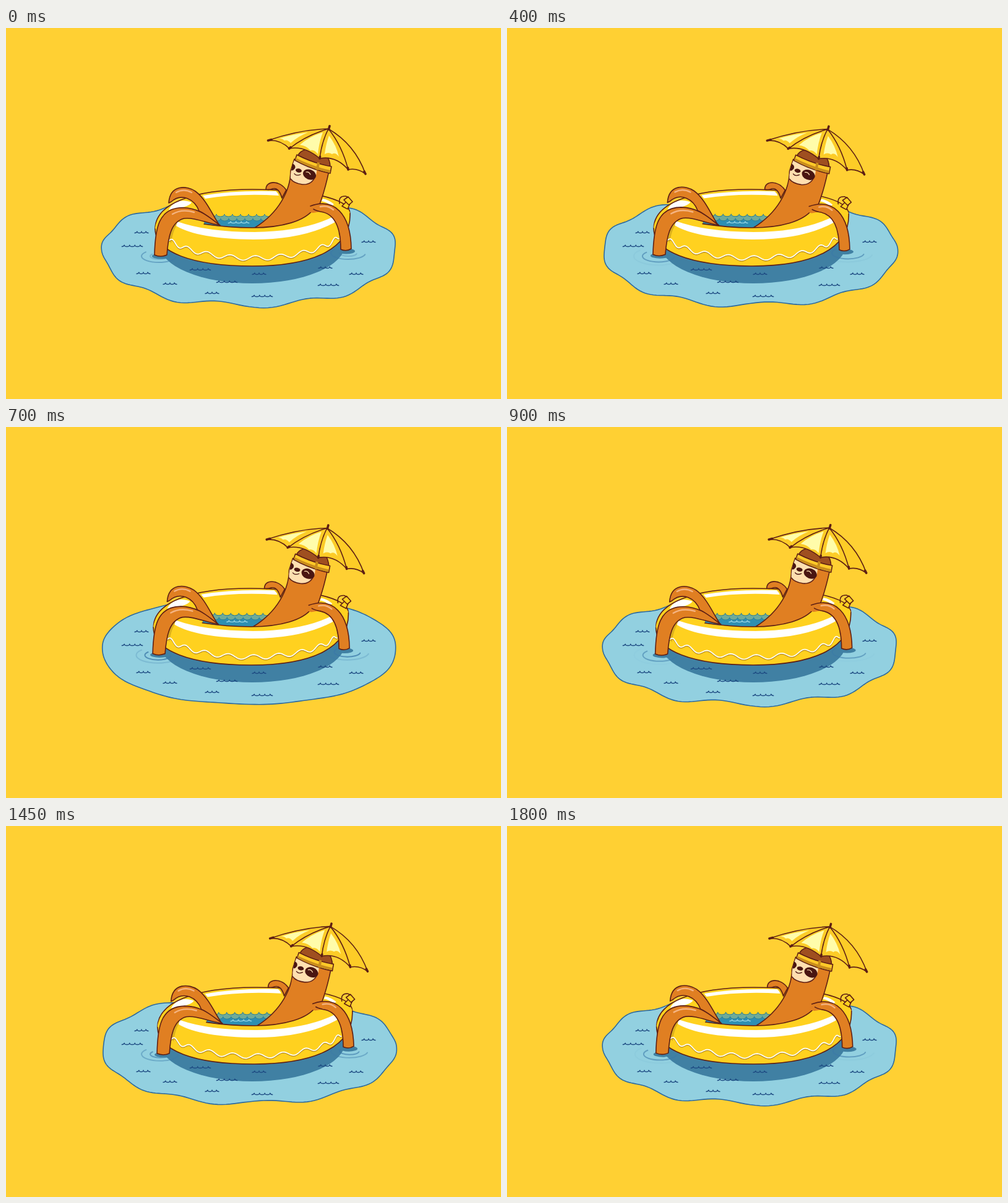
Animation, 800 px wide and 600 px high, one loop 1850 ms. Source, as an HTML page:

```html
<!DOCTYPE html>
<html lang="en">
<head>
<meta charset="utf-8">
<title>Floating sloth</title>
<style>
html, body { margin: 0; height: 100%; overflow: hidden; background: #ffd033 }
svg { display: block; width: 800px; height: 600px }
path, ellipse { stroke-linecap: round; stroke-linejoin: round }
.ink { stroke: #5e1f14; stroke-width: 1.6 }
.line { fill: none }
.tip { stroke-width: 3.6 }
.fur { fill: #e07f22 }
.gold { fill: #ffd11f }
.shade { fill: #dcb01c }
.dark { fill: #4a1612 }
.pale { fill: #fffcaa }
.white { fill: #fff }
.shadow { fill: #4080a3 }
.shine { fill: none; stroke: #f5b482; stroke-width: 2.4 }
.ring { fill: none; stroke: #3a78a8; stroke-width: 2 }
.mark { fill: none; stroke: #1d4a82; stroke-width: 1.3 }
</style>
</head>
<body>
<svg viewBox="0 0 800 600">
  <path id="pond" fill="#92d0e0" stroke="#2d6a9e" stroke-width="1.6"/>
  <ellipse class="shadow" cx="398" cy="350" rx="150" ry="63"/>
  <path id="marks" class="mark"/>
  <g id="rings"></g>

  <g id="float">
    <ellipse class="shadow" cx="251" cy="369" rx="15" ry="4.5"/>
    <ellipse class="shadow" cx="550" cy="361" rx="14" ry="4.5"/>

    <!-- tube, back half -->
    <path class="gold" d="M241 325C241 285 300 261 398 261C470 261 556 272 556 300C558 355 500 385 398 385C300 385 241 362 241 325Z"/>
    <path class="white" d="M318 271Q370 262 436 264Q440 267 441 271Q375 267 322 276Z"/>
    <path class="shade" d="M436 262L456 264L449 290Q446 272 436 262Z"/>
    <path class="white" d="M263 294C270 280 285 276 300 282Q296 290 263 294Z"/>
    <path class="white" d="M512 276Q522 278 530 285L526 288Q518 281 510 280Z"/>
    <g id="pool"></g>
    <path class="ink line" d="M241 325C241 285 300 261 398 261C470 261 556 272 556 300"/>

    <!-- valve -->
    <path class="ink gold" d="M543 288L550 281L556 284L552 293Z"/>
    <path class="ink gold" d="M546 278L553 273L560 281L554 286Z"/>
    <path class="ink line" d="M539 284Q537 271 549 272L553 274"/>

    <!-- far arm, body and face -->
    <path class="ink fur" d="M420 261C420 246 442 246 453 262L446 275C443 264 438 258 431 260Q426 262 420 261Z"/>
    <path class="ink fur" d="M460 231C460 262 441 299 402 323L480 330L505 290Q515 265 522 231L500 215L466 212Z"/>
    <path fill="#ffdfb0" d="M466 214L502 224C504 244 493 255 479 253Q465 251 460 245Q459 230 466 214Z"/>
    <path class="ink line" d="M460 244Q465 251 479 253Q494 254 500 240"/>
    <ellipse class="dark" cx="490.5" cy="237" rx="11" ry="8" transform="rotate(22 490.5 237)"/>
    <path class="dark" d="M463 219Q469 222 467 227Q463 232 461 230Z"/>
    <ellipse class="dark" cx="473" cy="230.5" rx="5" ry="3.2" transform="rotate(12 473 230.5)"/>
    <path class="line" stroke="#4a1612" stroke-width="1.3" d="M466 235.5Q469 240 476 237"/>
    <path class="line" stroke="#ffdfb0" stroke-width="1.2" d="M485 233Q490 232 492 237"/>

    <!-- hat -->
    <path class="ink" fill="#9f4f20" d="M472 206C480 188 524 192 524 225Q497 219 472 206Z"/>
    <path class="ink" fill="#ffc928" d="M470 205Q497 219 526 224L524 235Q494 229 467 214Z"/>
    <path fill="#c98d1c" d="M468 210Q496 224 524 230L523.5 234Q494 228 468 213.5ZM503 217L507 218L505 230L501 229Z"/>

    <!-- umbrella -->
    <path class="ink" fill="#fdcc27" d="M423 182C455 171 489 164 521 163C550 180 570 205 581 236Q568 226 553 229Q533 206 507 211Q482 190 458 195Q443 180 423 182Z"/>
    <path class="pale" d="M441 179Q463 172 488 169Q472 175 460 186Q455 180 450 182Q446 178 441 179ZM475 189Q491 175 512 169Q506 184 504 204Q498 196 492 198Q485 190 475 189ZM515 204Q517 188 522 174Q534 190 538 208Q532 200 527 204Q521 200 515 204Z"/>
    <path class="ink line" d="M521 163Q484 174 458 195M521 163Q510 185 507 211M521 163Q543 190 553 229"/>
    <path class="ink line tip" d="M521.5 164L523 158.500M423.500 182L429 180.500M457.500 195L460 193M507 211L507.500 208M553 229L552.500 226M581 236L579 232"/>

    <!-- tube, front half -->
    <path class="gold" d="M268 300C290 315 340 323 398 323C447 323 483 312 497 293C530 285 556 290 556 300C558 355 500 385 398 385C300 385 241 362 241 325C241 312 250 302 268 300Z"/>
    <path class="shade" d="M262 342Q264 320 278 308L283 310Q270 322 267 348ZM543 315L537 333L541 339Z"/>
    <path class="white" d="M277 313Q325 330 402 330Q485 329 533 303Q540 307 530 315Q480 342 400 342Q310 341 275 320Z"/>
    <path id="dripShade" class="line" stroke="#b98e22" stroke-width="1.5" transform="translate(0 1.5)"/>
    <path id="drip" class="line" stroke="#fff" stroke-width="1.7"/>
    <path class="ink line" d="M320 317Q360 323 398 323C447 323 483 312 497 293M556 300C558 355 500 385 398 385C300 385 241 362 241 325"/>

    <!-- near limbs -->
    <path class="ink fur" d="M263 283C265 252 293 255 306 264C324 277 335 305 345 319C330 307 320 299 312 296C305 277 284 266 267 281Z"/>
    <path class="ink fur" d="M240 367C241 325 246 291 285 290.5C315 291 330 308 346 319C325 316 305 306 288 308C266 313 262 340 260 367Q250 371.5 240 367Z"/>
    <path class="fur" d="M485 296L497 286L512 285L508 297L496 299Z"/>
    <path class="ink fur" d="M492 288C530 274 557 300 558 357Q550 362 541 358C541 325 532 300 508 297Q500 295 497 293"/>
    <path class="shine" d="M275 266Q287 259 300 266M269 301Q284 292 304 298M508 289Q520 286 529 294"/>
  </g>
</svg>
<script>
const $ = id => document.getElementById(id);
const LOOP = 1850, STEP = 50, WOBBLE = 900, TAU = 2 * Math.PI;
const { sin, cos, abs, sign } = Math;

// Path through n + 1 samples of f(0..1)
const trace = (n, f) => 'M' + Array.from({ length: n + 1 }, (_, i) => f(i / n).map(v => v.toFixed(2))).join('L');

// Rounded blob whose rim carries a standing wave of 11 crests
function pondPath(swell) {
  const round = v => sign(v) * abs(v) ** .91;
  return trace(240, u => {
    const a = TAU * u, wave = swell * cos(11 * (a - 1.48));
    const height = sin(a) > 0 ? 90 : 82;
    return [393 + (237 + 2 * wave) * round(cos(a)), 358 + (height + 5 * wave) * round(sin(a))];
  }) + 'Z';
}

// Icing edge: a wave wrapped around the tube's front
const drip = trace(160, u => {
  const a = -1.2 + 2.48 * u;
  return [398 + 146 * sin(a), 323 + 49 * cos(a) - 3.8 * cos(22.5 * (a - .035))];
});
$('drip').setAttribute('d', drip);
$('dripShade').setAttribute('d', drip);

// Little waves: n bowls between two tails
const bowls = (n, w, h) => `a${w / 2} ${h} 0 0 0 ${w} 0`.repeat(n);
function ripple(x, y, n) {
  const w = n > 2 ? 8.5 : 7;
  return `M${x - n * w / 2 - 4} ${y + 1.5}q3 0 4-2.500${bowls(n, w, 2.5)}q1 2.500 4 2.500`;
}
const small = [[219, 330], [222, 396], [265, 413], [333, 428], [409, 397], [516, 387], [566, 397], [586, 345]];
const wide = [[204, 352], [314, 390], [357, 410], [414, 433], [521, 415]];
$('marks').setAttribute('d', small.map(p => ripple(...p, 2)).join('') + wide.map(p => ripple(...p, 3)).join(''));

const poolLayer = (x, y, fill) =>
  `<path fill="${fill}" stroke="#2b7f96" d="M${x} ${y}${bowls(8, 13, 4)}V326H${x}Z"/>`;
$('pool').innerHTML = poolLayer(327, 301, '#70ab98') + poolLayer(321, 308, '#2e8fb2') +
  `<path fill="none" stroke="#8fd0e0" stroke-width="1.4" d="${ripple(376, 314, 3)}"/>`;

// Two expanding rings around each dipped limb
const rings = [[247, 369], [553, 364]].flatMap(([x, y]) => [0, .5].map(lag => {
  const el = document.createElementNS('http://www.w3.org/2000/svg', 'ellipse');
  el.setAttribute('class', 'ring');
  el.setAttribute('pathLength', 100);
  el.setAttribute('stroke-dasharray', '56 44');
  el.setAttribute('stroke-dashoffset', -2);
  $('rings').append(el);
  return { el, x, y, lag };
}));

function draw(now) {
  const t = Math.floor(now % LOOP / STEP) * STEP;
  const sway = -sin(TAU * t / LOOP);
  $('float').setAttribute('transform', `translate(${4 * sway}) rotate(${-.3 * sway} 400 330)`);
  $('pond').setAttribute('d', pondPath(cos(TAU * t / WOBBLE)));

  for (const { el, x, y, lag } of rings) {
    const p = (2 * t / LOOP + lag) % 1, r = 14 + 28 * p;
    el.setAttribute('cx', x + 2 * sway);
    el.setAttribute('cy', y);
    el.setAttribute('rx', r);
    el.setAttribute('ry', r * .36);
    el.setAttribute('opacity', (1 - p) * Math.min(1, .3 + p * 5));
  }
  requestAnimationFrame(draw);
}
draw(0);
</script>
</body>
</html>
```
